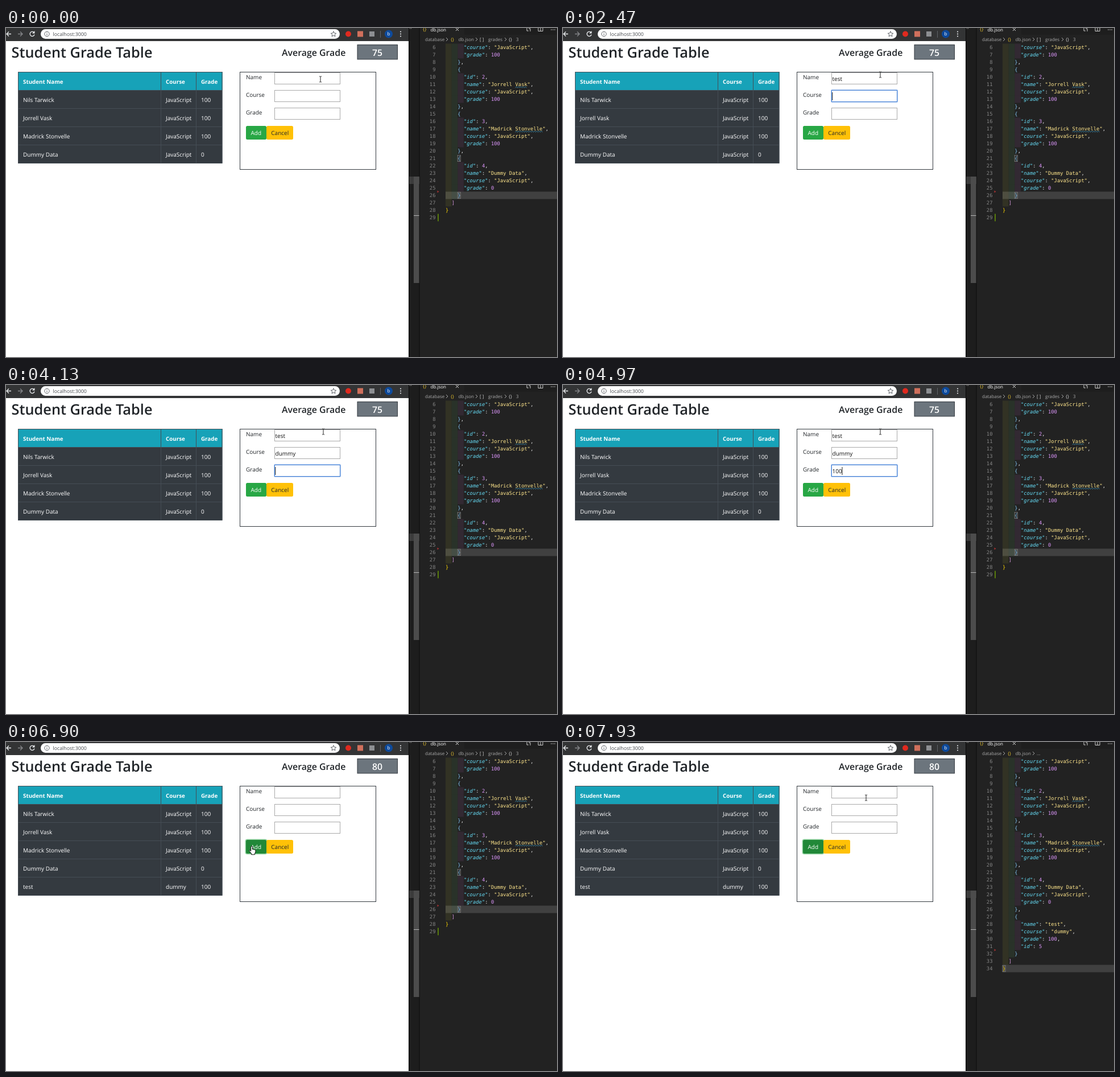
An HTML page that plays this animation: 969x578 px, repeating every 8 s.

```html
<!DOCTYPE html>
<html lang="en">
<head>
<meta charset="utf-8">
<title>Student Grade Table</title>
<style>
  html, body { margin: 0; width: 100%; height: 100%; overflow: hidden; background: #fff; }
  svg { display: block; width: 969px; height: 578px; }
  text { font-family: "Open Sans", "Noto Sans CJK KR", "Noto Sans CJK", sans-serif; white-space: pre; text-rendering: geometricPrecision; }
  .code { font-family: "DejaVu Sans Mono", monospace; font-size: 8.86px; }
  .key { fill: #66dcf6; font-style: italic; }
  .str { fill: #ffe68c; }
  .num { fill: #dc96fa; }
</style>
</head>
<body>
<svg id="stage" viewBox="0 0 969 578"></svg>
<script>
const LOOP = 8000, PRESS = 6600, ADDED = 6820, SAVED = 7060, CRUMB = 7300;
const CHAR = 5.33, CODE_X = 773, DARK = '#212529';

const students = [
  ['Nils Tarwick', 'JavaScript', 100],
  ['Jorrell Vask', 'JavaScript', 100],
  ['Madrick Stonvelle', 'JavaScript', 100],
  ['Dummy Data', 'JavaScript', 0],
  ['test', 'dummy', 100]
];
const hints = [
  ['test', 'wkt4072_bDol', '별누리', 'arnovel4@example.com', 'PebbleLanterns', '갈솔빈', 'test1', 'test2'],
  ['dummy'],
  ['100']
];
// time, field, text in the field
const edits = [
  [450, 0, ''], [1860, 0, 't'], [1940, 0, 'te'], [2090, 0, 'tes'], [2170, 0, 'test'],
  [2470, 1, ''], [3030, 1, 'd'], [3110, 1, 'du'], [3340, 1, 'dum'], [3500, 1, 'dumm'], [3810, 1, 'dummy'],
  [4130, 2, ''], [4670, 2, '1'], [4810, 2, '10'], [4970, 2, '100']
];
// time, x, y of the pointer
const path = [
  [0, 553, 90], [660, 553, 90], [668, 557, 83], [1040, 557, 83], [1050, 558, 82], [5673, 558, 82],
  [5827, 589, 108], [5904, 594, 140], [5981, 575, 178], [6058, 528, 199], [6135, 465, 200],
  [6212, 423, 188.5], [6366, 424, 187], [6520, 431, 182], [7444, 434, 186],
  [7521, 444, 196], [7598, 466, 190], [7752, 514, 140], [7900, 533, 98], [8000, 533, 98]
];

const pen = document.createElement('canvas').getContext('2d');
const textWidth = s => { pen.font = '10px "Open Sans", sans-serif'; return pen.measureText(s).width; };

const rect = (x, y, w, h, fill, more = '') =>
  `<rect x="${x}" y="${y}" width="${w}" height="${h}" fill="${fill}" ${more}/>`;
const box = (x, y, w, h, fill, line, more = '') =>
  rect(x + .5, y + .5, w - 1, h - 1, fill, `stroke="${line}" ${more}`);
const text = (x, y, s, size = 10, fill = DARK, more = '') =>
  `<text x="${x}" y="${y}" font-size="${size}" fill="${fill}" ${more}>${s}</text>`;
const stroke = (d, color, w = 1, more = '') =>
  `<path d="${d}" fill="none" stroke="${color}" stroke-width="${w}" ${more}/>`;
const dot = (x, y, r, fill) => `<circle cx="${x}" cy="${y}" r="${r}" fill="${fill}"/>`;
const bold = 'font-weight="600"', strong = 'font-weight="700"', middle = 'text-anchor="middle"';

function toolbar() {
  const dots = [6.5, 10.5, 14.5].map(y => dot(694, y, 1.1, '#e8eaed')).join('');
  return rect(0, 0, 708, 23, '#333435') + rect(61, 2, 526, 17, '#fff', 'rx="8.5"') +
    stroke('M9 10.5H1M5 6.5L1 10.5l4 4', '#e8eaed', 1.3) +
    stroke('M21 10.5h8M25 6.5l4 4-4 4', '#85868a', 1.3) +
    stroke('M49 7.6A4 4 0 1 0 50 11.5', '#e8eaed', 1.4) + '<path d="M50.5 5v4.5H46z" fill="#e8eaed"/>' +
    stroke('M67.8 10.5a4.2 4.2 0 1 0 8.4 0a4.2 4.2 0 1 0-8.4 0M72 9.8v3M72 7.8v1', '#5f6368') +
    text(82.5, 13.6, 'localhost:3000', 8.8, '#46494d') +
    stroke('M576 5.8l1.4 3.2 3.4.3-2.6 2.2.8 3.4-3-1.8-3 1.8.8-3.4-2.6-2.2 3.4-.3z', '#5f6368') +
    dot(602, 10.5, 5, '#e02a1f') + rect(618, 5.5, 10, 10, '#d0705c') + rect(639, 6, 9, 9, '#8d8f92') +
    rect(658, 5, 1, 12, '#5f6368') + dot(673, 10.5, 7, '#0d4a9c') +
    text(673, 13.3, 'b', 8, '#fff', middle) + dots;
}

function gradeTable(rows) {
  const bottom = 109.5 + rows.length * 32, line = '#454d55', xs = [30, 281, 343];
  let out = rect(21, 77, 359.5, bottom - 77, '#343a40') + rect(21, 77, 359.5, 32.5, '#17a2b8');
  ['Student Name', 'Course', 'Grade'].forEach((s, i) => out += text(xs[i], 97.6, s, 9.8, '#fff', strong));
  rows.forEach((row, r) => {
    row.forEach((s, i) => out += text(xs[i], 130.1 + r * 32, s, 10, '#fff'));
    out += stroke(`M21 ${109.5 + r * 32}H380`, line);
  });
  return out + stroke(`M272.5 77V${bottom}M334.5 77V${bottom}`, line) + box(21, 77, 359.5, bottom - 76.5, 'none', line);
}

function dropdown(y, items) {
  return box(471, y, 126, items.length * 23.3 + 11, '#fff', '#d5d5d5',
    'rx="2" style="filter:drop-shadow(0 1px 1px #0004)"') +
    items.map((s, i) => text(479, y + 20 + i * 23.3, s, 8.25, '#333')).join('');
}

function form(t, added, hover) {
  const done = edits.filter(e => e[0] <= t), last = done[done.length - 1];
  const pressed = t >= PRESS, values = ['', '', ''];
  if (!added) done.forEach(e => values[e[1]] = e[2]);
  let out = box(411, 77, 240, added ? 204 : 172, '#fff', '#343a40'), popup = '';
  ['Name', 'Course', 'Grade'].forEach((label, i) => {
    const y = 78 + i * 31, focus = last && !pressed && last[1] === i;
    out += text(422, y + 12, label) + box(472, y, 116, 21, '#fff', focus ? '#4a84d6' : '#a9a9a9');
    if (focus) out += box(471, y - 1, 118, 23, 'none', '#a9c6f0', 'rx="1"');
    out += text(473.5, y + 14.6, values[i], 10, '#111');
    if (!focus) return;
    if (Math.floor((t - last[0]) / 540) % 2 === 0)
      out += rect(473.3 + textWidth(values[i]), y + 4, 1, 14, '#222');
    const open = i === 0 || (values[i] && !hints[i].includes(values[i]));
    if (open) popup = dropdown(y + 22, hints[i].filter(s => s.startsWith(values[i])).slice(0, 6));
  });
  if (pressed) out += rect(420.5, 170.5, 39, 27, '#93d3a2', 'rx="4"');
  return out + rect(422, 172, 36, 24, pressed || hover ? '#218838' : '#28a745', 'rx="2.5"') +
    rect(458, 172, 47, 24, '#ffc107', 'rx="2.5"') +
    text(430.5, 187.6, 'Add', 10, '#fff') + text(466.3, 187.6, 'Cancel') + popup;
}

function jsonLines(rows, saved) {
  const lines = [[0, '{'], [2, '"grades": [']];
  rows.forEach(([name, course, grade], i) => {
    const fields = [`"name": "${name}"`, `"course": "${course}"`, `"grade": ${grade}`];
    i < 4 ? fields.unshift(`"id": ${i + 1}`) : fields.push(`"id": ${i + 1}`);
    lines.push([4, '{'], ...fields.map((s, k) => [6, s + (k < 3 ? ',' : '')]),
      [4, i < rows.length - 1 ? '},' : '}']);
  });
  lines.push([2, ']'], [0, '}']);
  if (!saved) lines.push([0, '']);
  return lines;
}

const bracketColor = { 0: '#ffd700', 2: '#da9be0', 4: '#87cefa' };
const paint = (s, indent) => s
  .replace(/("\w+")(: )(".*"|\d+)?/, (_, k, colon, v = '') =>
    `<tspan class='key'>${k}</tspan>${colon}<tspan class='${v[0] === '"' ? 'str' : 'num'}'>${v}</tspan>`)
  .replace(/^[{}\]]/, c => `<tspan fill='${bracketColor[indent]}'>${c}</tspan>`);

function editor(saved, shortCrumb) {
  const lines = jsonLines(students.slice(0, saved ? 5 : 4), saved);
  const rowY = n => 27.5 + (n - 6) * 13, current = saved ? 34 : 26;
  const tints = ['#ffff40', '#7fff7f', '#ff7fff'];
  let out = rect(708, 0, 261, 578, '#222') + rect(708, 0, 19, 578, '#1d1d1d') + rect(708, 0, 1, 578, '#080808') +
    rect(726.5, 0, 1, 578, '#0c0c0c') + rect(709, 261, 18, 13, '#3b3b3b') + rect(717, 261, 9.5, 187, '#4c4c4c') +
    rect(717, 329, 9.5, 1, '#b5b5b5') + text(709, 4, '··', 9, '#ccc') +
    rect(806, 0, 163, 12, '#1e1e1e') +
    text(733, 5, '{}', 8.5, '#e8c32e') + text(746.5, 5.5, 'db.json', 8, '#fff') +
    stroke('M791 0l5 5M796 0l-5 5', '#ddd') + stroke('M916 0v5h3M922 6V1h-3M936 0v5.5h8V0M940 0v5', '#ccc') +
    [959, 962, 965].map(x => dot(x, 3, .8, '#ccc')).join('');

  const crumb = (x, s, fill = '#a8a8a8') => text(x, 23, s, 8, fill);
  out += crumb(737, 'database') + crumb(782, '{}', '#e8c32e') + crumb(795.5, 'db.json');
  out += shortCrumb ? crumb(833, '...')
    : crumb(833, '[ ]', '#ccc') + crumb(848, 'grades') + crumb(884, '{}', '#ccc') + crumb(897, '3');
  (shortCrumb ? [774, 826] : [774, 826, 877]).forEach(x => out += stroke(`M${x} 17l3 3-3 3`, '#a8a8a8'));

  out += rect(CODE_X, rowY(current), 196, 13, '#404040');
  lines.forEach(([indent, s], i) => {
    const n = i + 1, y = rowY(n), x = CODE_X + indent * CHAR;
    if (n < 6) return;
    for (let k = 0; k < indent / 2; k++)
      out += rect(CODE_X + k * 2 * CHAR, y, 2 * CHAR, 13, tints[k], 'fill-opacity=".07"');
    if (n === current || (!saved && n === 21)) out += box(x - .5, y + .5, 6, 12, 'none', '#777');
    out += text(755.5, y + 9.6, n, 8.86, '#858585', 'class="code" text-anchor="end"') +
      text(x, y + 9.6, paint(s, indent), 8.86, '#f0f0f0', 'class="code"');
    const word = s.match(/ (Vask|Stonvelle)"/);
    if (word) {
      const from = x + (word.index + 1) * CHAR, waves = Math.round(word[1].length * CHAR / 4);
      out += stroke(`M${from} ${y + 12.3}` + 'l2-1.6 2 1.6'.repeat(waves), '#3f9fc8', .8);
    }
  });
  const mark = rowY(saved ? 32 : 26);
  out += `<path d="M758.5 ${mark - 2}l3 2-3 2z" fill="#a83232"/>`;
  return saved ? out : out + rect(759, rowY(29), 2, 13, '#587c0c');
}

function pointerAt(t) {
  const s = 5750 + Math.floor((t - 5750) / 77) * 77;   // the pointer is sampled every 77 ms
  const i = Math.max(1, path.findIndex(p => p[0] > s));
  const [a, b] = [path[i - 1], path[i]], k = Math.max(0, (s - a[0]) / (b[0] - a[0]));
  return [a[1] + (b[1] - a[1]) * k, a[2] + (b[2] - a[2]) * k];
}

function pointer(x, y) {
  const inside = (l, t, r, b) => x >= l && x <= r && y >= t && y <= b;
  const move = `transform="translate(${x.toFixed(1)} ${y.toFixed(1)})"`;
  const solid = d => `<path d="${d}" fill="#fff" stroke="#111" stroke-linejoin="round" ${move}/>`;
  if (inside(422, 172, 505, 196))
    return solid('M-1.3 1Q-1.3-.3 0-.3T1.3 1V5l4 .8Q7 6.2 7 8q0 3-1.5 4.5v2h-6v-1.8l-3.6-4.5q-.3-1.5 1-1.3l1.8 1.4z');
  if ([78, 109, 140].some(top => inside(472, top, 588, top + 21)))
    return stroke('M-2-5h1.5L0-4.5.5-5H2M0-4.5v9M-2 5h1.5L0 4.5.5 5H2', '#222', 1, move);
  return solid('M0 0v12l2.8-2.6 2 4.6 2-.9-2-4.4h3.7z');
}

const stage = document.getElementById('stage');
let shown = '';
function render(t) {
  const [x, y] = pointerAt(t), added = t >= ADDED;
  const hover = x >= 422 && x <= 458 && y >= 172 && y <= 196;
  const picture = rect(0, 0, 969, 578, '#fff') + toolbar() +
    text(9.5, 52.3, 'Student Grade Table', 25.35, DARK, bold) +
    text(485, 49, 'Average Grade', 15.9, DARK, bold) +
    box(617.5, 29, 71.5, 26.5, '#6c757d', '#343a40') +
    text(653, 48.8, added ? 80 : 75, 15.8, '#fff', bold + ' ' + middle) +
    gradeTable(students.slice(0, added ? 5 : 4)) + form(t, added, hover) +
    editor(t >= SAVED, t >= CRUMB) + pointer(x, y);
  if (picture !== shown) stage.innerHTML = shown = picture;
}

const start = performance.now();
function tick() {
  render((performance.now() - start) % LOOP);
  requestAnimationFrame(tick);
}
tick();
</script>
</body>
</html>
```
